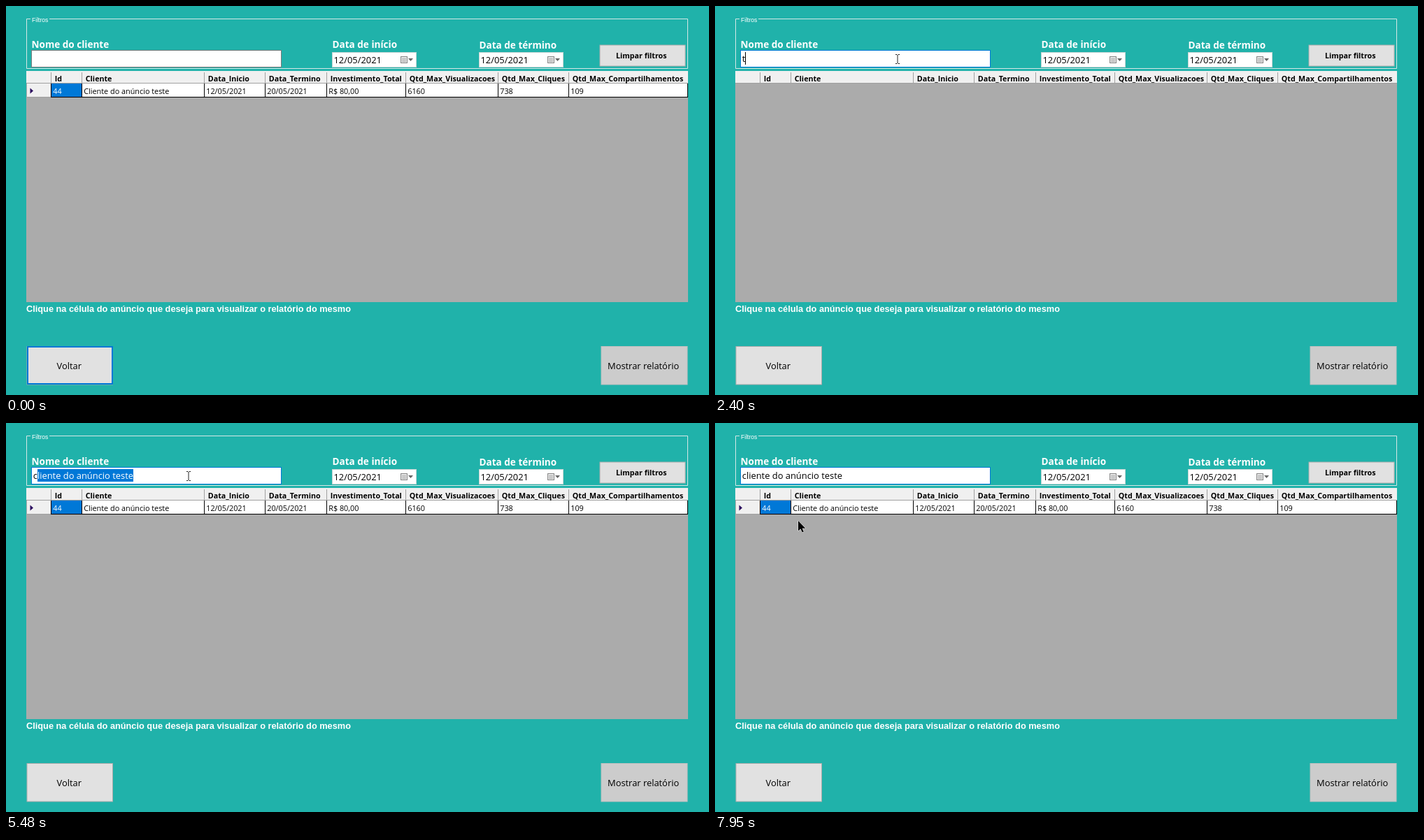
Recreate the animation shown at these times as an HTML page. Size 1005 px wide and 557 px high, loop 8 s.

```html
<!DOCTYPE html>
<html lang="pt">
<head>
<meta charset="utf-8">
<title>Filtros</title>
<style>
html, body { margin: 0; width: 100%; height: 100%; overflow: hidden; background: #20b2aa; }
svg { display: block; width: 1005px; height: 557px; }
text { font-family: "Open Sans", "Noto Sans", sans-serif; fill: #000; white-space: pre; }
.label { font-size: 13.55px; font-weight: 700; fill: #fff; }
.head { font-size: 10.7px; font-weight: 700; }
.cell { font-size: 10.85px; }
.input { font-size: 12.9px; }
.light { fill: #fff; }
.legend, .hint { font-family: "Liberation Sans", Arial, sans-serif; fill: #fff; }
.legend { font-size: 8.6px; }
.hint { font-size: 12.77px; font-weight: 700; }
</style>
</head>
<body>
<svg id="stage" viewBox="0 0 1005 557" xmlns="http://www.w3.org/2000/svg"></svg>
<script>
const LOOP = 8000, REFRESH = 70, BLINK = 530;
const BLUE = '#0078d7', EDGE = '#a0a0a0', FACE = '#e1e1e1';
const PHRASE = 'cliente do anúncio teste';
const stage = document.getElementById('stage');

function add(tag, attrs, parent = stage, content) {
  const el = document.createElementNS('http://www.w3.org/2000/svg', tag);
  for (const k in attrs) el.setAttribute(k, attrs[k]);
  if (content) el.textContent = content;
  parent.appendChild(el);
  return el;
}
const group = () => add('g', {});
const rect = (x, y, width, height, fill, parent) => add('rect', { x, y, width, height, fill }, parent);
const text = (x, y, cls, str, parent) => add('text', { x, y, class: cls }, parent, str);
const path = (d, fill, stroke, parent) => add('path', { d, fill, stroke }, parent);
const show = (el, on) => el.setAttribute('visibility', on ? 'visible' : 'hidden');

function box(x, y, w, h, fill, stroke, line = 1) {
  const el = rect(x + line / 2, y + line / 2, w - line, h - line, fill);
  el.setAttribute('stroke', stroke);
  el.setAttribute('stroke-width', line);
  return el;
}

function datePicker(x, y, label) {
  text(x + .5, y, 'label', label);
  box(x, 66, 121, 22, '#fff', '#c4d4d3');
  text(x + 2.5, 81.7, 'input', '12/05/2021');
  box(x + 98, 72, 10, 10, '#e6e6e6', '#858585');
  path(`M${x + 100} 75.5h6m-6 2h6m-6 2h6`, 'none', '#aaa');
  path(`M${x + 109} 75h7l-3.5 4z`, '#666', 'none');
}

// Filter panel
rect(0, 0, 1005, 557, '#20b2aa');
path('M35 18.5H29.5V89.5H974.5V18.5H62', 'none', '#d5e8e6');
text(37, 22.6, 'legend', 'Filtros');
text(36.5, 59.6, 'label', 'Nome do cliente');
datePicker(466, 59.6, 'Data de início');
datePicker(676, 60.6, 'Data de término');
box(848.5, 55.5, 123, 31, FACE, '#adadad');
text(872, 75, 'head', 'Limpar filtros');

// Grid: width, heading, value
const columns = [
  [44, 'Id', '44'],
  [175, 'Cliente', 'Cliente do anúncio teste'],
  [87, 'Data_Inicio', '12/05/2021'],
  [88, 'Data_Termino', '20/05/2021'],
  [113, 'Investimento_Total', 'R$ 80,00'],
  [132, 'Qtd_Max_Visualizacoes', '6160'],
  [101, 'Qtd_Max_Cliques', '738'],
  [170, 'Qtd_Max_Compartilhamentos', '109']
];
rect(29, 93, 946, 331, '#ababab');
rect(29, 93, 946, 18, '#f0f0f0');
rect(29, 110, 946, 1, EDGE);
const rowLeft = group(), rowRight = group();
rect(30, 111, 34, 19, '#f0f0f0', rowLeft);
rect(30, 130, 34, 1, EDGE, rowLeft);
path('M34.5 117.5v8l4.5-4z', '#2a0a5e', 'none', rowLeft);

let left = 64;
columns.forEach(([width, head, value], i) => {
  const row = i < 6 ? rowLeft : rowRight;
  rect(left, 95, 1, 15, EDGE);
  text(left + 5.8, 107.5, 'head', head);
  rect(left, 111, width + 1, 20, '#000', row);
  rect(left + 1, 111, width - 1, 19, i ? '#fff' : BLUE, row);
  text(left + 3.2, 126, i ? 'cell' : 'cell light', value, row);
  left += width;
});
const lastLine = rect(804, 111, 1, 20, '#000');

text(29, 438.4, 'hint', 'Clique na célula do anúncio que deseja para visualizar o relatório do mesmo');

// Bottom buttons
box(29.5, 487, 123.5, 55.5, FACE, '#adadad');
const focusRing = box(30, 487, 123, 55, 'none', BLUE, 2);
text(72.5, 520, 'input', 'Voltar');
box(850.5, 487, 124, 55.5, '#ccc', '#bfbfbf');
text(860, 520, 'input', 'Mostrar relatório');

// Name field
const field = box(36, 63, 358, 25, '#fff', '#7a7a7a');
const selection = rect(45, 66, 137, 18, BLUE);
const entry = text(38.8, 80.3, 'input', '');
const typed = add('tspan', {}, entry);
const picked = add('tspan', { class: 'light', style: 'fill:#fff' }, entry);
const caret = rect(38, 66, 1, 18, '#000');

// Pointer
const halo = add('circle', { cx: 261, cy: 76, r: 10.3, fill: '#fff13a', 'fill-opacity': .85 });
const pointer = group();
const arrow = path('M0 0V14.6L3.4 11.6L5.6 16.6L7.8 15.7L5.7 10.7H10.2Z', '#000', '#fff', pointer);
arrow.setAttribute('paint-order', 'stroke');
const beam = path('M-3 -6.5H-1L0 -5.5L1 -6.5H3M0 -5.5V5.5M-3 6.5H-1L0 5.5L1 6.5H3', 'none', '#222', pointer);

// Field content after each click or key
const clicks = [1940, 7350];
const entries = [
  [0, ''], [clicks[0], ''], [2330, 't'], [2470, 'te'], [2930, 'tes'],
  [3800, 'te'], [4210, 't'], [4480, ''], [5480, 'c'], [clicks[1], PHRASE]
];
const entryAt = t => entries.filter(e => e[0] <= t).pop() || entries[0];
const matches = t => PHRASE.startsWith(entryAt(t)[1]);

// Pointer moves along quadratic curves
const easeOut = p => 1 - (1 - p) ** 4;
const easeBoth = p => p * p * (3 - 2 * p);
const rest = [261, 76], label = [110, 59];
const moves = [
  { from: 70, to: 1000, a: [942, 543], b: [601, 309], c: rest, ease: easeOut },
  { from: 6610, to: 6830, a: rest, b: [185, 67], c: label, ease: easeBoth },
  { from: 6830, to: 7150, a: label, b: [185, 67], c: rest, ease: easeBoth },
  { from: 7450, to: 7950, a: rest, b: [185, 215], c: [119, 140], ease: easeBoth }
];

function pointerAt(t) {
  const m = moves.filter(v => v.from <= t).pop() || moves[0];
  const span = m.to - m.from, steps = Math.round(span / REFRESH);
  const part = Math.min(1, Math.max(0, (t - m.from) / span));
  const p = m.ease(Math.floor(part * steps) / steps), q = 1 - p;
  return m.a.map((a, i) => q * q * a + 2 * p * q * m.b[i] + p * p * m.c[i]);
}

function mix(a, b, p) {
  const k = Math.min(1, Math.max(0, p));
  return `rgb(${a.map((v, i) => Math.round(v + (b[i] - v) * k))})`;
}
const grey = [122, 122, 122], dark = [23, 23, 23], blue = [0, 120, 215];
const borderAt = t => t < clicks[0]
  ? mix(grey, dark, (t - 810) / 190)
  : mix(dark, blue, (t - clicks[0]) / 200);

function draw(t) {
  const [since, value] = entryAt(t);
  const completed = value === 'c';
  typed.textContent = value;
  picked.textContent = completed ? PHRASE.slice(1) : '';
  show(selection, completed);
  caret.setAttribute('x', Math.floor(38.6 + (value ? entry.getComputedTextLength() : 0)));
  const lit = Math.floor((t - since) / BLINK) % 2 === 0;
  show(caret, t >= clicks[0] && lit && !completed);
  field.setAttribute('stroke', borderAt(t));
  show(focusRing, t < clicks[0]);

  // The grid repaints one refresh after the filter changes.
  const now = matches(t), before = matches(t - REFRESH);
  show(rowLeft, now || before);
  show(rowRight, before);
  show(lastLine, now || before);

  const [x, y] = pointerAt(t);
  const inField = x < 394 && y >= 63 && y < 88;
  pointer.setAttribute('transform', `translate(${x} ${y})`);
  show(arrow, t >= moves[0].from && !inField);
  show(beam, inField);
  show(halo, clicks.some(c => t >= c && t < c + 2 * REFRESH));
}

const start = performance.now();
function tick() {
  draw((performance.now() - start) % LOOP);
  requestAnimationFrame(tick);
}
tick();
</script>
</body>
</html>
```
